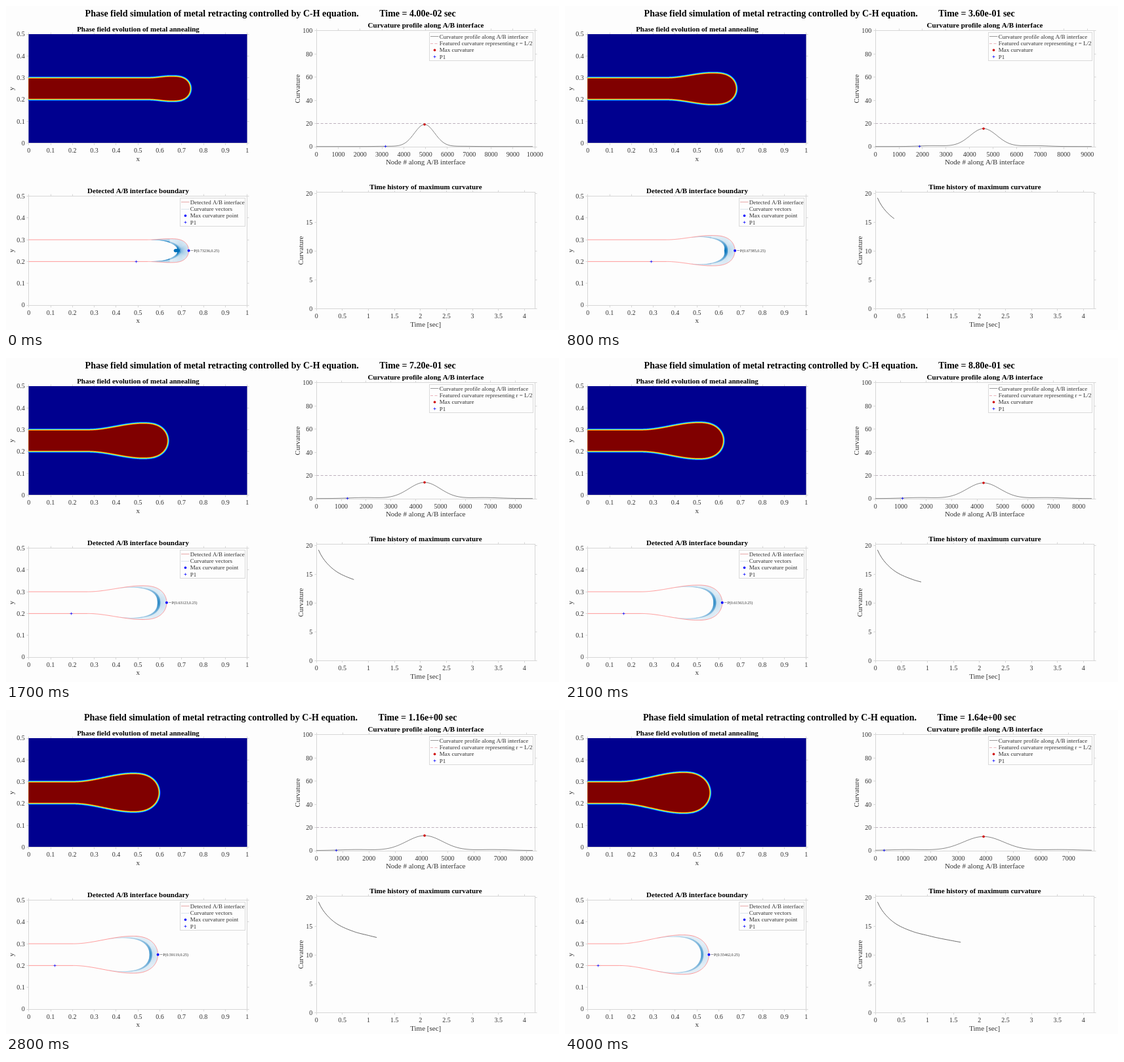
An HTML page with a canvas for the animation above (4.1 s loop, 843 px wide and 495 px high).

```html
<!DOCTYPE html>
<html lang="en">
<head>
<meta charset="utf-8">
<title>Phase field simulation</title>
<style>
  html, body { margin: 0; width: 843px; height: 495px; overflow: hidden; background: #fdfdfd; }
  canvas { display: block; }
</style>
</head>
<body>
<canvas id="stage" width="843" height="495"></canvas>
<script>
const ctx = document.getElementById('stage').getContext('2d');
const SERIF = '"Liberation Serif", "Times New Roman", serif';
const STEPS = 41, STEP_MS = 100, DT = 0.04;
const PAPER = '#fdfdfd', INK = '#333', AXIS = '#d6d6d6', BLUE = '#0000ff', RED = '#d00000';
const UNIT = 333, LEFT = 34.7, LEFT2 = 473.2;
const NODE = 1.553e-4; // arc length per interface node

// Smooth tracks over the square root of simulated time.
const KEYS = [0.04, 0.36, 0.72, 1, 1.16, 1.4, 1.64].map(Math.sqrt);

function track(values) {
  const last = KEYS.length - 1;
  const slope = i => {
    const a = Math.max(0, i - 1), b = Math.min(last, i + 1);
    return (values[b] - values[a]) / (KEYS[b] - KEYS[a]);
  };
  return time => {
    const u = Math.sqrt(time);
    let i = 0;
    while (i < last - 1 && u > KEYS[i + 1]) i++;
    const w = KEYS[i + 1] - KEYS[i], p = (u - KEYS[i]) / w, q = 1 - p;
    return values[i] * (1 + 2 * p) * q * q + slope(i) * w * p * q * q
      + values[i + 1] * (3 - 2 * p) * p * p - slope(i + 1) * w * p * p * q;
  };
}

const tipAt = track([0.73236, 0.67385, 0.63123, 0.60478, 0.59119, 0.57213, 0.55462]);
const peakAt = track([19.2, 15.6, 14.05, 13.38, 13.03, 12.6, 12.2]);
const spanAt = track([10001, 9280, 8790, 8457, 8312, 8062, 7915]);
const bulgeAt = track([0.0545, 0.0695, 0.0775, 0.0825, 0.085, 0.088, 0.0905]);
const capAt = track([0.087, 0.108, 0.111, 0.113, 0.115, 0.118, 0.12]);
const neckAt = track([0.1, 0.205, 0.25, 0.265, 0.272, 0.283, 0.29]);
const markAt = track([198.5, 131, 99.5, 82.5, 74, 61.5, 50.5]);

function text(str, x, y, size, { align = 'center', bold = false, color = INK, turn = false } = {}) {
  ctx.save();
  ctx.translate(x, y);
  if (turn) ctx.rotate(-Math.PI / 2);
  ctx.font = `${bold ? 'bold ' : ''}${size}px ${SERIF}`;
  ctx.textAlign = align;
  ctx.fillStyle = color;
  ctx.fillText(str, 0, 0);
  ctx.restore();
}

function line(points, color, width = 1, dash = []) {
  ctx.beginPath();
  points.forEach(([x, y]) => ctx.lineTo(x, y));
  ctx.strokeStyle = color;
  ctx.lineWidth = width;
  ctx.setLineDash(dash);
  ctx.stroke();
  ctx.setLineDash([]);
}

function dot(x, y, r, color) {
  ctx.beginPath();
  ctx.arc(x, y, r, 0, 7);
  ctx.fillStyle = color;
  ctx.fill();
}

function plus(x, y) {
  line([[x - 2, y], [x + 2, y]], BLUE, 0.7);
  line([[x, y - 2], [x, y + 2]], BLUE, 0.7);
}

const snap = v => Math.floor(v) + 0.5;
const range = (count, step) => Array.from({ length: count }, (_, i) => +(i * step).toFixed(2));

function axes({ x, y, w, h, title, titleY, xlabel, ylabel, ylabelX, xs, ys, px, py }) {
  const l = snap(x), t = snap(y), r = snap(x + w), b = snap(y + h);
  ctx.strokeStyle = AXIS;
  ctx.lineWidth = 1;
  ctx.strokeRect(l, t, r - l, b - t);
  for (const v of xs) {
    const c = snap(px(v));
    line([[c, b], [c, b + 3]], AXIS);
    line([[c, t], [c, t - 3]], AXIS);
    text(v, px(v), y + h + 14.8, 10);
  }
  for (const v of ys) {
    const c = snap(py(v));
    line([[l, c], [l - 3, c]], AXIS);
    line([[r, c], [r + 3, c]], AXIS);
    text(v, x - 6, py(v) + 3.4, 10, { align: 'right' });
  }
  text(title, x + w / 2 + 0.3, titleY, 11, { bold: true, color: '#000' });
  text(xlabel, x + w / 2, y + h + 27.2, 11);
  text(ylabel, ylabelX, y + h / 2, 11, { turn: true });
}

function legend(x, y, w, rows) {
  ctx.fillStyle = PAPER;
  ctx.fillRect(x, y, w, 43);
  ctx.strokeStyle = '#dadada';
  ctx.lineWidth = 1;
  ctx.strokeRect(x, y, w, 43);
  rows.forEach(([label, sample], i) => {
    const cy = y + 6.1 + i * 10.4;
    sample(x + 1.5, cy);
    text(label, x + 15.2, cy + 2.9, 9, { align: 'left' });
  });
}

const rule = (color, dash) => (x, y) => line([[x, snap(y)], [x + 12.5, snap(y)]], color, 1, dash);
const bead = color => (x, y) => dot(x + 6.5, y, 1.8, color);
const cross = (x, y) => plus(snap(x + 6), snap(y));

// Upper half of the interface from the tip leftwards, in pixels about the mid line.
// `lift` is 1 on the rounded cap and fades to 0 along the neck.
function interfaceHalf(time) {
  const tip = tipAt(time), h = bulgeAt(time), cap = capAt(time), neck = neckAt(time);
  const power = 2 * cap / (peakAt(time) * h * h);
  const pts = [];
  const add = (d, y, lift) => pts.push({ x: (tip - d) * UNIT, y: y * UNIT, lift });
  for (let i = 0; i <= 64; i++) {
    const d = (i / 64) ** 2;
    add(d * cap, h * Math.sqrt(1 - (1 - d) ** power), 1);
  }
  for (let i = 1; i <= 90; i++) {
    const v = i / 90, lift = 1 - v * v * (3 - 2 * v);
    add(cap + v * neck, 0.05 + (h - 0.05) * lift, lift);
  }
  add(tip + 0.03, 0.05, 0);
  let s = 0;
  pts.forEach((p, i) => {
    const a = i ? pts[i - 1] : { x: pts[1].x, y: -pts[1].y };
    const b = pts[i + 1] || p;
    const dx = b.x - a.x, dy = b.y - a.y, len = Math.hypot(dx, dy);
    if (i) s += Math.hypot(p.x - a.x, p.y - a.y);
    p.s = s;
    p.nx = -dy / len;
    p.ny = dx / len;
  });
  return pts;
}

// Whole outline, moved outwards by `grow`, and by `swell` more around the bulge.
function outline(half, ox, oy, grow = 0, swell = 0) {
  const side = sign => half.map(p => {
    const out = grow + swell * p.lift;
    return [ox + p.x - p.nx * out, oy - sign * (p.y - p.ny * out)];
  });
  return side(1).reverse().concat(side(-1).slice(1));
}

function clipped(x, y, w, h, paint) {
  ctx.save();
  ctx.beginPath();
  ctx.rect(x, y, w, h);
  ctx.clip();
  paint();
  ctx.restore();
}

const JET = [[2.3, '#0000c4'], [1.7, '#0058ff'], [1.2, '#20dcff'], [0.4, '#98ff68'],
  [-0.1, '#ffe010'], [-0.7, '#ff5000'], [-1.3, '#800000']];

const px1 = v => LEFT + v * UNIT;
const tenths = range(11, 0.1), fifths = range(6, 0.1);

function phasePlot(time, half) {
  const py = v => 209.5 - v * UNIT;
  axes({ x: LEFT, y: 43, w: UNIT, h: 166.5, title: 'Phase field evolution of metal annealing', titleY: 38.7,
    xlabel: 'x', ylabel: 'y', ylabelX: 11.7, xs: tenths, ys: fifths, px: px1, py });
  clipped(34.5, 43, 333, 166, () => {
    ctx.fillStyle = '#00008f';
    ctx.fillRect(34, 43, 334, 166);
    const shift = 0.9 + 1.2 * Math.exp(-time / 0.45);
    for (const [grow, color] of JET) {
      ctx.beginPath();
      outline(half, LEFT + shift, py(0.25), grow, 1).forEach(([x, y]) => ctx.lineTo(x, y));
      ctx.fillStyle = color;
      ctx.fill();
    }
  });
}

function vectors(half, ox, oy, time) {
  const peak = peakAt(time), sigma = 1.39 / peak * UNIT;
  const gain = 0.98 + 0.24 * Math.exp(-time / 0.25);
  ctx.lineWidth = 0.75;
  half.forEach((p, i) => {
    const len = gain * peak * Math.exp(-0.5 * (p.s / sigma) ** 2);
    if (len < 0.5) return;
    for (const sign of i ? [1, -1] : [1]) {
      const x = ox + p.x, y = oy - sign * p.y;
      const vx = p.nx * len, vy = -sign * p.ny * len;
      const ex = x + vx, ey = y + vy;
      ctx.strokeStyle = 'rgba(0,114,189,0.14)';
      ctx.beginPath();
      ctx.moveTo(x, y);
      ctx.lineTo(ex, ey);
      ctx.stroke();
      ctx.strokeStyle = 'rgba(0,114,189,0.24)';
      ctx.beginPath();
      ctx.moveTo(ex - 0.3 * vx - 0.1 * vy, ey - 0.3 * vy + 0.1 * vx);
      ctx.lineTo(ex, ey);
      ctx.lineTo(ex - 0.3 * vx + 0.1 * vy, ey - 0.3 * vy - 0.1 * vx);
      ctx.stroke();
    }
  });
}

function boundaryPlot(time, half) {
  const py = v => 457 - v * UNIT, mid = py(0.25), tip = tipAt(time), tx = px1(tip);
  axes({ x: LEFT, y: 290.5, w: UNIT, h: 166.5, title: 'Detected A/B interface boundary', titleY: 286,
    xlabel: 'x', ylabel: 'y', ylabelX: 11.7, xs: tenths, ys: fifths, px: px1, py });
  clipped(34.5, 290, 333, 167, () => {
    vectors(half, LEFT, mid, time);
    line(outline(half, LEFT, mid), '#ff7878', 0.75);
  });
  dot(tx, mid, 2, BLUE);
  line([[tx + 3, snap(mid)], [tx + 7, snap(mid)]], '#777', 0.7);
  text(`P(${tip.toFixed(5)},0.25)`, tx + 7.7, mid + 2, 6, { align: 'left' });
  plus(snap(markAt(time)), snap(py(0.2)));
  legend(265.5, 293.5, 99, [
    ['Detected A/B interface', rule('#e8a8a8')],
    ['Curvature vectors', rule('#dbe5ec')],
    ['Max curvature point', bead(BLUE)],
    ['P1', cross]
  ]);
}

function profilePlot(time) {
  const span = spanAt(time), peak = peakAt(time);
  const px = v => LEFT2 + v / span * UNIT, py = v => 215 - v * 1.772;
  axes({ x: LEFT2, y: 37.8, w: UNIT, h: 177.2, title: 'Curvature profile along A/B interface', titleY: 33.2,
    xlabel: 'Node # along A/B interface', ylabel: 'Curvature', ylabelX: 448.3,
    xs: range(Math.floor(span / 1000) + 1, 1000), ys: range(6, 20), px, py });
  const end = px(span / 1.01), mid = (LEFT2 + end) / 2;
  const sigma = 2.97e6 / (peak * span), lobe = 1 - Math.exp(-time / 0.15);
  const bell = z => Math.exp(-z * z / 2);
  line([[LEFT2, 179.5], [LEFT2 + UNIT, 179.5]], '#bcb0bc', 1, [4, 2.5]);
  const curve = [];
  for (let i = 0; i <= 330; i++) {
    const x = LEFT2 + (end - LEFT2) * i / 330, z = Math.abs(x - mid) / sigma;
    curve.push([x, py(0.2 + (peak - 0.2) * bell(z) + 0.8 * lobe * bell((z - 3.8) / 0.95))]);
  }
  line(curve, '#5c5c5c', 0.75);
  dot(mid, py(peak), 1.8, RED);
  plus(snap(LEFT2 + (markAt(time) - LEFT) / (NODE * span)), 214.5);
  legend(645.5, 40.5, 158, [
    ['Curvature profile along A/B interface', rule('#9a9a9a')],
    ['Featured curvature representing r = L/2', rule('#eab4bc', [4, 2.5])],
    ['Max curvature', bead(RED)],
    ['P1', cross]
  ]);
}

function historyPlot(step) {
  const px = v => LEFT2 + v * UNIT / 4.2, py = v => 462.3 - v * 8.81;
  axes({ x: LEFT2, y: 284.7, w: UNIT, h: 177.6, title: 'Time history of maximum curvature', titleY: 280.4,
    xlabel: 'Time [sec]', ylabel: 'Curvature', ylabelX: 453,
    xs: range(9, 0.5), ys: range(5, 5), px, py });
  const curve = [];
  for (let i = 1; i <= step + 1; i++) curve.push([px(i * DT), py(peakAt(i * DT))]);
  if (step) line(curve, '#484848', 0.8);
}

function draw(step) {
  const time = (step + 1) * DT, half = interfaceHalf(time);
  ctx.fillStyle = PAPER;
  ctx.fillRect(0, 0, 843, 495);
  const clock = time.toExponential(2).replace(/\d$/, '0$&');
  text('Phase field simulation of metal retracting controlled by C-H equation.'
    + '\u00a0'.repeat(9) + `Time = ${clock} sec`, 403.2, 15.5, 14, { bold: true, color: '#000' });
  phasePlot(time, half);
  boundaryPlot(time, half);
  profilePlot(time);
  historyPlot(step);
}

let shown = -1;
const start = performance.now();
function tick() {
  const step = Math.floor((performance.now() - start) / STEP_MS) % STEPS;
  if (step !== shown) draw(shown = step);
  requestAnimationFrame(tick);
}
tick();
</script>
</body>
</html>
```
